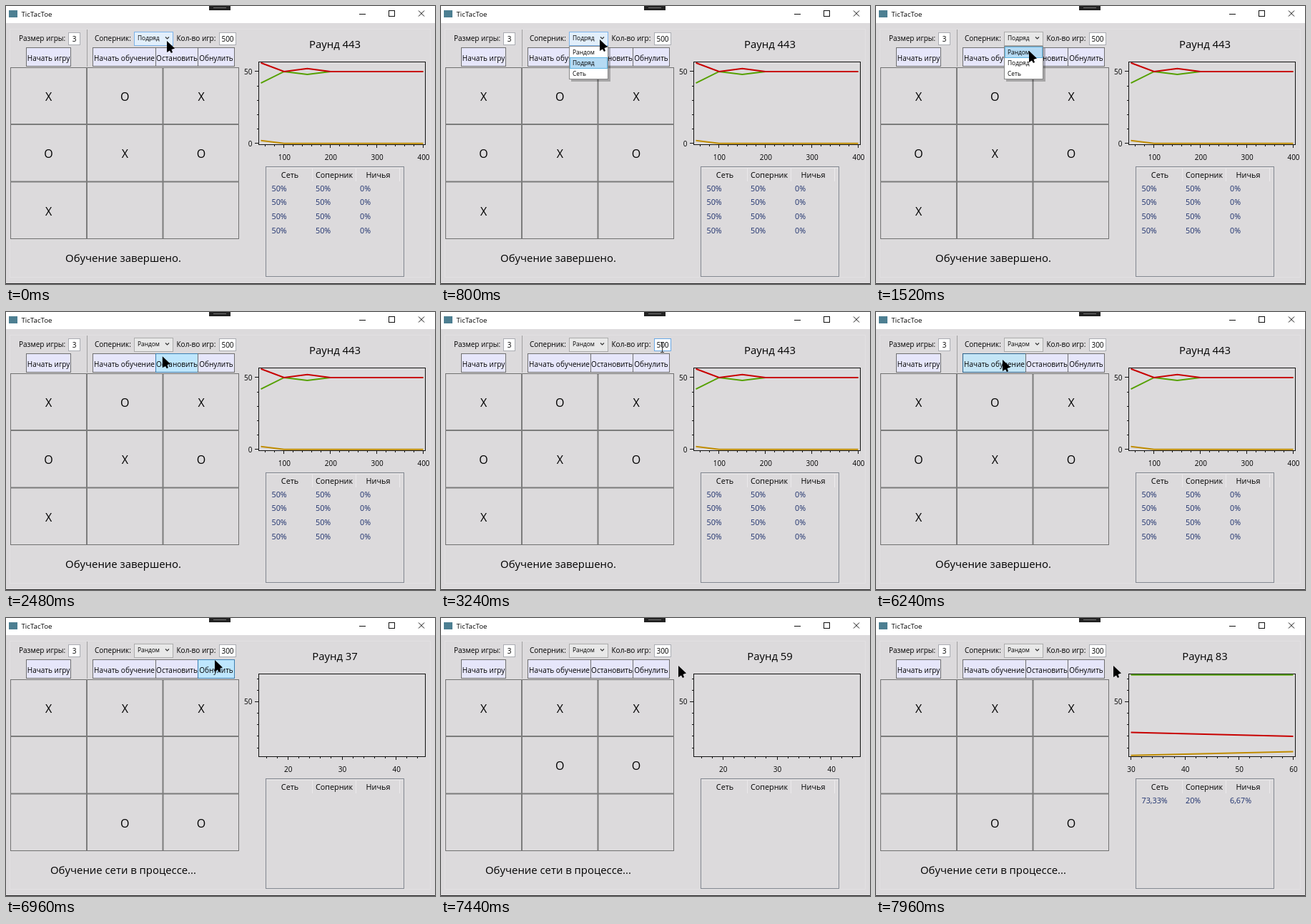
An HTML page with a canvas that plays this animation: 600x390 px, repeating every 8 s.

```html
<!DOCTYPE html>
<html lang="ru">
<head>
<meta charset="utf-8">
<title>TicTacToe</title>
<style>
html, body { margin: 0; width: 100%; height: 100%; overflow: hidden; background: #dcdadc; }
canvas { display: block; }
</style>
</head>
<body>
<canvas id="stage" width="600" height="390"></canvas>
<script>
const ctx = document.getElementById('stage').getContext('2d');
const LOOP = 8000, STEP = 40;
const OPEN = 800, CLOSE = 2000, FOCUS = 3520, ERASE = 4320, RETYPE = 4760, PRESS = 6200, START = 6320;
const COLORS = ['#55a000', '#c80000', '#c08c00'];

// Pointer stops: time, x, y
const POINTER = [
  [0, 225, 49], [240, 222, 47], [1240, 222, 47], [1520, 214, 63], [2360, 214, 63], [3240, 309, 49],
  [5440, 309, 49], [5880, 177, 67], [6400, 177, 67], [6960, 292, 59], [7360, 332, 67], [LOOP, 332, 67]
];

const BUTTONS = [
  [28, 90, 'Начать игру'], [121, 209, 'Начать обучение'],
  [209, 268, 'Остановить'], [268, 319, 'Обнулить']
];

const OLD_PLOT = {
  x: [50, 400], y: [0, 56], majorX: 100, majorY: 50,
  series: [[42, 50, 48, 50, 50, 50, 50, 50], [56, 50, 52, 50, 50, 50, 50, 50], [2, 0, 0, 0, 0, 0, 0, 0]]
};
const EMPTY_PLOT = { x: [0, 1], y: [0, 1], majorX: 0.5, majorY: 0.5, series: [] };
const ONE_POINT_PLOT = { x: [15, 45], y: [3.33, 73.33], majorX: 10, majorY: 50, series: [] };
const TWO_POINT_PLOT = {
  x: [30, 60], y: [3.33, 73.33], majorX: 10, majorY: 50,
  series: [[73.33, 73.33], [23.33, 20], [3.33, 6.67]]
};

function rect(x, y, w, h, fill, stroke) {
  if (fill) { ctx.fillStyle = fill; ctx.fillRect(x, y, w, h); }
  if (stroke) {
    ctx.strokeStyle = stroke;
    ctx.lineWidth = 1;
    ctx.strokeRect(x + .5, y + .5, w - 1, h - 1);
  }
}

function text(s, x, y, size = 10, align = 'left', color = '#000') {
  ctx.font = `${size}px "Open Sans", "Noto Sans", sans-serif`;
  ctx.textAlign = align;
  ctx.fillStyle = color;
  ctx.fillText(s, x, y);
}

function path(points, color, width = 1) {
  ctx.beginPath();
  points.forEach(([x, y]) => ctx.lineTo(x, y));
  ctx.strokeStyle = color;
  ctx.lineWidth = width;
  ctx.stroke();
}

function pointerAt(t) {
  const i = POINTER.findIndex(p => p[0] > t);
  const [t0, x0, y0] = POINTER[i - 1], [t1, x1, y1] = POINTER[i];
  const u = (t - t0) / (t1 - t0), e = u * u * (3 - 2 * u);
  return { x: x0 + (x1 - x0) * e, y: y0 + (y1 - y0) * e };
}

function roundAt(t) {
  if (t < START) return 443;
  return Math.floor(t < 6960 ? 1 + 36 * (t - START) / 640 : 37 + 46 * (t - 6960) / 1000);
}

function boardAt(t, round) {
  if (t < START) return 'XOXOXOX  ';
  const k = (round + 9) % 23, cells = Array(9).fill(' ');
  cells.fill('X', 0, k % 4 === 3 ? 2 : 3);
  cells[8 - k % 6] = 'O';
  cells[3 + (k * k + 4) % 6] = 'O';
  return cells.join('');
}

function drawWindow() {
  rect(0, 0, 600, 390, '#dcdadc');
  rect(0, 0, 600, 24, '#fff');
  rect(284, 0, 30, 6, '#222');
  rect(290, 2, 18, 1, '#777');
  rect(4, 6, 12, 10, '#4d7f92');
  text('TicTacToe', 21.5, 15, 9.7);
  path([[494, 11.5], [503, 11.5]], '#111');
  rect(535, 6, 9, 9, null, '#111');
  path([[577, 6.5], [585, 14.5]], '#111');
  path([[585, 6.5], [577, 14.5]], '#111');
  rect(5, 32, 589, 349, null, '#e2e0e2');
  rect(0, 389, 600, 1, '#222');
}

function drawTextBox(x, w, value, active) {
  rect(x, 37, w, 18, '#fff', active ? '#6aa9e6' : '#abadb3');
  text(value, x + w / 2, 49.5, 10, 'center');
}

function drawCombo(x, value, hover) {
  rect(x, 36, 55, 20, hover ? '#e2effb' : '#e8e8e8', hover ? '#7eb4ea' : '#acacac');
  text(value, x + 5, 48, 8.4);
  path([[x + 44, 43.5], [x + 46.5, 46], [x + 49, 43.5]], '#333', 1.2);
}

function drawToolbar(t, pointer, popup) {
  const count = t < ERASE ? '500' : t < RETYPE ? '00' : '300';
  const dx = (3 - count.length) * 2.85;
  const inBox = pointer.x > 298 && pointer.x < 322 && pointer.y > 37 && pointer.y < 55;
  const focused = t >= FOCUS && t < PRESS;
  const overCombo = pointer.x > 179 && pointer.x < 234 && pointer.y > 36 && pointer.y < 56;

  path([[113.5, 33], [113.5, 85]], '#a0a0a0');
  text('Размер игры:', 18, 49);
  drawTextBox(87, 17, '3', false);
  text('Соперник:', 124 + dx, 49);
  drawCombo(179 + dx, t < CLOSE ? 'Подряд' : 'Рандом', overCombo);
  text('Кол-во игр:', 238.5 + dx, 49);
  drawTextBox(298 + dx, 24 - 2 * dx, count, inBox || focused);

  const lastKey = t < ERASE ? FOCUS : t < RETYPE ? ERASE : RETYPE;
  if (focused && (t - lastKey) % 1040 < 520) rect(dx ? 304 : 307, 39, 1, 13, '#111');

  BUTTONS.forEach(([left, right, label], i) => {
    const hover = !popup && pointer.x >= left && pointer.x < right && pointer.y >= 58 && pointer.y < 85;
    const pressed = i === 1 && t >= PRESS && t < START;
    rect(left, 58, right - left + 1, 27, pressed ? '#c4e5f6' : hover ? '#bee6fd' : '#e6e6fa',
      pressed ? '#2c628b' : hover ? '#3c7fb1' : '#707070');
    text(label, (left + right) / 2 + .5, 76.5, 10, 'center');
  });
  return inBox;
}

function drawPopup(pointer) {
  rect(182, 59, 55, 47, 'rgba(0,0,0,.25)');
  rect(179, 56, 55, 47, '#fff', '#888');
  const selected = pointer.y > 57 ? 0 : 1;
  ['Рандом', 'Подряд', 'Сеть'].forEach((label, i) => {
    if (i === selected) rect(180, 57 + i * 15, 53, 16, '#b5daf3', '#5fb4e2');
    text(label, 184, 68 + i * 15, 8.4);
  });
}

function drawBoard(cells) {
  rect(6, 86, 320, 241, null, '#707070');
  [113, 219.5].forEach(x => path([[x, 86], [x, 326]], '#7c7c7c', 2));
  [166, 246.5].forEach(y => path([[6, y], [326, y]], '#7c7c7c', 2));
  [...cells].forEach((mark, i) =>
    text(mark, 59.5 + i % 3 * 106.8, 133 + Math.floor(i / 3) * 80.4, 16, 'center'));
}

// Calls back for each tick lying inside the visible range, five minor steps per major
function eachTick([min, max], major, visit) {
  const minor = major / 5, margin = (max - min) * .01;
  for (let n = Math.ceil((min - margin) / minor); n * minor <= max + margin; n++) visit(n * minor, n % 5 === 0);
}

function drawPlot({ x, y, majorX, majorY, series }) {
  const px = v => 356.5 + 227 * (v - x[0]) / (x[1] - x[0]);
  const py = v => 192.8 - 113 * (v - y[0]) / (y[1] - y[0]);
  const label = v => String(+v.toFixed(1));
  rect(353, 78, 234, 117, null, '#111');
  eachTick(x, majorX, (v, isMajor) => {
    const at = Math.floor(px(v)) + .5;
    path([[at, 194], [at, isMajor ? 199 : 197]], '#111');
    if (isMajor) text(label(v), px(v) + .5, 215.5, 10, 'center');
  });
  eachTick(y, majorY, (v, isMajor) => {
    const at = Math.floor(py(v)) + .5;
    path([[353, at], [isMajor ? 348 : 351, at]], '#111');
    if (isMajor) text(label(v), 344.5, py(v) + 4, 10, 'right');
  });
  series.forEach((values, i) => {
    const dx = (x[1] - x[0]) / (values.length - 1);
    path(values.map((v, n) => [px(x[0] + n * dx), py(v)]), COLORS[i], 2);
  });
}

function drawTable(rows) {
  rect(363, 225, 194, 155, null, '#828790');
  [428.5, 489.5, 550.5].forEach(x => path([[x, 228], [x, 246]], '#ebe9eb'));
  path([[365, 227.5], [555, 227.5]], '#e8e6e8');
  ['Сеть', 'Соперник', 'Ничья'].forEach((s, i) => text(s, [397, 459, 520.5][i], 241, 10.8, 'center'));
  rows.forEach((row, r) => row.forEach((s, c) =>
    text(s, [371.5, 433, 495][c], 259.5 + r * 19.7, 10.8, 'left', '#1c2f6c')));
}

function drawPointer({ x, y }, ibeam) {
  if (ibeam) {
    path([[x + .5, y - 6], [x + .5, y + 7]], '#333');
    path([[x - 2, y - 6.5], [x + 3, y - 6.5]], '#333');
    path([[x - 2, y + 7.5], [x + 3, y + 7.5]], '#333');
    return;
  }
  ctx.beginPath();
  [[0, 0], [0, 16], [4, 13.5], [6, 17], [8, 16], [6.5, 12], [11, 10.5]]
    .forEach(([dx, dy]) => ctx.lineTo(x + dx, y + dy));
  ctx.fillStyle = '#000';
  ctx.fill();
}

function draw(t) {
  const pointer = pointerAt(t), round = roundAt(t), training = t >= START;
  const popup = t >= OPEN && t < CLOSE;
  drawWindow();
  const ibeam = drawToolbar(t, pointer, popup);
  drawBoard(boardAt(t, round));
  text(training ? 'Обучение сети в процессе...' : 'Обучение завершено.', 164, 359, 14.9, 'center');
  text('Раунд ' + round, 460, 58.5, 14.9, 'center');
  drawPlot(!training ? OLD_PLOT : round < 30 ? EMPTY_PLOT : round < 60 ? ONE_POINT_PLOT : TWO_POINT_PLOT);
  drawTable(!training ? Array(4).fill(['50%', '50%', '0%']) : round < 60 ? [] : [['73,33%', '20%', '6,67%']]);
  if (popup) drawPopup(pointer);
  drawPointer(pointer, ibeam);
}

const begin = performance.now();
function frame() {
  const t = (performance.now() - begin) % LOOP;
  draw(Math.floor(t / STEP) * STEP);
  requestAnimationFrame(frame);
}
frame();
</script>
</body>
</html>
```
